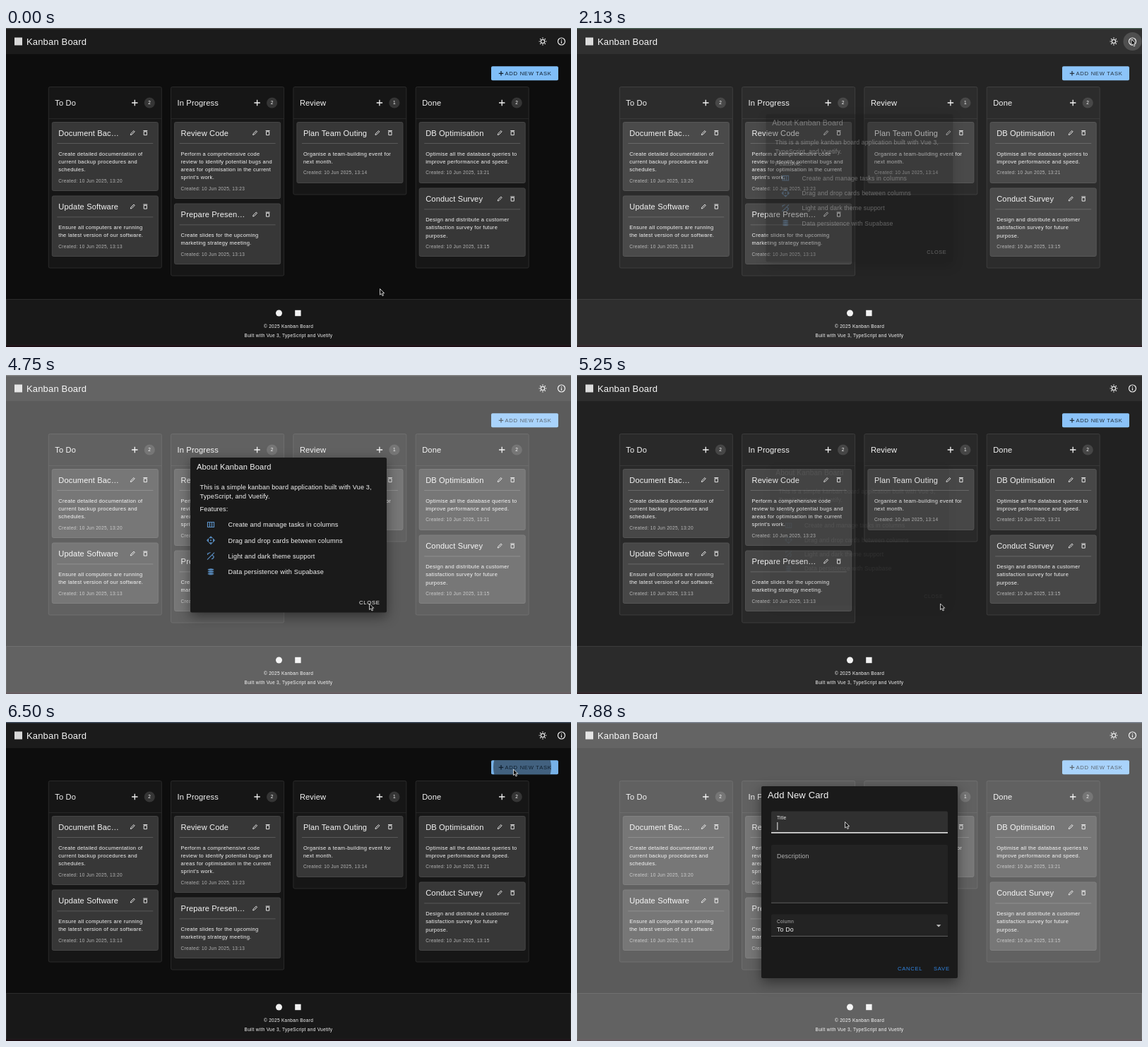
An HTML page that plays this animation: 800x452 px, repeating every 8 s.

```html
<!DOCTYPE html>
<html lang="en">
<head>
<meta charset="utf-8">
<title>Kanban Board</title>
<style>
  html, body { margin: 0; width: 100%; height: 100%; overflow: hidden; background: #0d0d0d; }
  svg { display: block; width: 100vw; height: 100vh; }
  text { font-family: "Liberation Sans", Arial, sans-serif; fill: #f4f4f4; white-space: pre; }
  .bar { font-size: 13px; letter-spacing: .16px; }
  .title { font-size: 11.1px; letter-spacing: .14px; }
  .body { font-size: 7.5px; letter-spacing: .27px; }
  .small { font-size: 6.5px; letter-spacing: .3px; }
  .text { font-size: 9.1px; letter-spacing: .17px; }
  .field { font-size: 8.8px; letter-spacing: .15px; }
  .btn { font-size: 7.7px; letter-spacing: .69px; }
  .line { fill: none; stroke: #f0f0f0; }
  .mid { text-anchor: middle; }
  .sheet { fill: #1a1a1a; filter: drop-shadow(0 6px 9px rgba(0, 0, 0, .45)); }
</style>
</head>
<body>
<svg id="stage" viewBox="0 0 800 452" xmlns="http://www.w3.org/2000/svg"></svg>
<script>
const LOOP = 8000, STEP = 125;

const text = (x, y, cls, str, fill) =>
  `<text x="${x}" y="${y}" class="${cls}"${fill ? ` style="fill:${fill}"` : ''}>${str}</text>`;
const rect = (x, y, w, h, fill, extra = '') =>
  `<rect x="${x}" y="${y}" width="${w}" height="${h}" fill="${fill}" ${extra}/>`;
const path = (d, width = 1, extra = '') =>
  `<path class="line" d="${d}" stroke-width="${width}" ${extra}/>`;
const at = (x, y, inner, scale = 1) =>
  `<g transform="translate(${x} ${y}) scale(${scale})">${inner}</g>`;

const plus = (x, y, r, color = '#f0f0f0') =>
  at(x, y, path(`M${-r} 0H${r}M0 ${-r}V${r}`, 1.3, `style="stroke:${color}"`));
const pencil = path('M-7 7l.8-4L4-7l3 3L-3 6.200z', 2.2);
const trash = path('M-5-4H5V7.500H-5zM-7-7H7', 2.2);

const columns = [
  ['To Do', 340, [
    ['Document Bac…', 133, 231, ['Create detailed documentation of', 'current backup procedures and', 'schedules.'], '13:20'],
    ['Update Software', 237.5, 324, ['Ensure all computers are running', 'the latest version of our software.'], '13:13']]],
  ['In Progress', 351, [
    ['Review Code', 133, 242, ['Perform a comprehensive code', 'review to identify potential bugs and', 'areas for optimisation in the current', 'sprint’s work.'], '13:23'],
    ['Prepare Presen…', 248.5, 335, ['Create slides for the upcoming', 'marketing strategy meeting.'], '13:13']]],
  ['Review', 236, [
    ['Plan Team Outing', 133, 220, ['Organise a team-building event for', 'next month.'], '13:14']]],
  ['Done', 340, [
    ['DB Optimisation', 133, 220, ['Optimise all the database queries to', 'improve performance and speed.'], '13:21'],
    ['Conduct Survey', 226.5, 324, ['Design and distribute a customer', 'satisfaction survey for future', 'purpose.'], '13:15']]]
];

function card(x, [title, top, bottom, lines, time]) {
  const first = top + 47.8;
  return rect(x + 5, top + .5, 150, bottom - top - 1, '#373737', 'rx="2" stroke="#454545"') +
    text(x + 14, top + 19.5, 'title', title) +
    at(x + 119, top + 15.5, pencil, .42) + at(x + 137, top + 15.5, trash, .42) +
    rect(x + 12, top + 30, 136, .8, '#626262') +
    lines.map((s, i) => text(x + 14, first + i * 11.1, 'body', s)).join('') +
    text(x + 14, first + lines.length * 11.1 + 4.4, 'small', `Created: 10 Jun 2025, ${time}`, '#b4b4b4');
}

function column([name, bottom, cards], i) {
  const x = 60.3 + i * 173.3;
  return rect(x, 83.5, 160, bottom - 83.5, '#161616', 'rx="2" stroke="#2b2b2b"') +
    rect(x, 128, 160, .8, '#2b2b2b') +
    text(x + 9, 110, 'title', name) + plus(x + 122, 106, 4.2) +
    `<circle cx="${x + 143}" cy="106" r="7.6" fill="#353535"/>` +
    text(x + 143, 108.4, 'small mid', cards.length) +
    cards.map(c => card(x, c)).join('');
}

const rays = [...Array(8)].map((_, i) => {
  const a = i * Math.PI / 4, c = Math.cos(a), s = Math.sin(a);
  return `M${c * 3.9} ${s * 3.9}L${c * 5.4} ${s * 5.4}`;
}).join('');

const page =
  rect(0, 0, 800, 452, '#0d0d0d') + rect(0, 0, 800, 37, '#1b1b1b') +
  rect(0, 0, 800, 1.3, '#505050', 'id="edge"') +
  rect(12, 13.5, 11, 11, '#d8d8d8') + text(29, 23.5, 'bar', 'Kanban Board') +
  at(760, 19, path(rays, 1.2) + '<circle r="2.7" class="line" stroke-width="1.2"/>') +
  at(786.5, 19, '<circle r="5" class="line" stroke-width="1.2"/>' + path('M0-.5V2.800M0-2.700V-1.500', 1.2)) +
  '<circle id="infoRipple" cx="786.5" cy="19" r="13" fill="#fff"/>' +
  rect(687, 54.3, 95, 20, '#80bef8', 'rx="2"') +
  '<g clip-path="url(#addClip)">' + rect(687, 54, 95, 21, '#000', 'id="addShade"') +
  '<circle id="addRipple" cx="731" cy="64" r="41" fill="#000"/></g>' +
  plus(701, 64.3, 3.2, '#10202f') + text(706.5, 67.1, 'btn', 'ADD NEW TASK', '#10202f') +
  columns.map(column).join('') +
  rect(.5, 384.500, 799, 65, '#181818', 'stroke="#2b2b2b"') +
  '<circle cx="386.5" cy="404" r="4.500" fill="#f0f0f0"/>' + rect(409.2, 399.8, 8.4, 8.4, '#f0f0f0') +
  text(400, 424.9, 'small mid', '© 2025 Kanban Board') +
  text(400, 438.4, 'small mid', 'Built with Vue 3, TypeScript and Vuetify') +
  rect(0, 449.500, 800, 2.500, '#1c0d13');

const blue = 'style="stroke:#5a8fc4"';
const features = [
  ['Create and manage tasks in columns', path('M-4.500-3.500H4.500V3.500H-4.500zM-1.500-3.500V3.500M1.500-3.500V3.500', 1.2, blue)],
  ['Drag and drop cards between columns', path('M-1.800-3.500L0-5.300 1.800-3.500zM-1.800 3.500L0 5.300 1.800 3.500zM-3.500-1.800L-5.300 0-3.500 1.800zM3.500-1.800L5.300 0 3.500 1.800zM-1 0H1M0-1V1', 1.1, blue)],
  ['Light and dark theme support', path('M-5 5L5-5M-4.500-1.500A3 3 0 0 1-1.500-4.500M-5-4L-4-3M-1-5.500V-4.500M1 4A3.500 3.500 0 0 0 4 0 3 3 0 0 1 1 4M2-1.500L4.500 1', 1.1, blue)],
  ['Data persistence with Supabase', [-3, 0, 3].map(y =>
    `<path d="M-4.300 ${y - 1}Q0 ${y - 2.8} 4.300 ${y - 1}V${y + .6}Q0 ${y + 2.4}-4.300 ${y + .6}z" fill="#5a8fc4" stroke="#1a1a1a" stroke-width=".5"/>`).join('')]
];

const about =
  rect(261, 117, 278, 219.5, '', 'rx="2" class="sheet"') +
  text(270, 134, 'title', 'About Kanban Board') +
  text(274.5, 162, 'text', 'This is a simple kanban board application built with Vue 3,') +
  text(274.5, 175.2, 'text', 'TypeScript, and Vuetify.') + text(274.5, 193.2, 'text', 'Features:') +
  features.map(([s, icon], i) =>
    at(290, 212 + i * 22.3, icon) + text(314.5, 215.3 + i * 22.3, 'text', s)).join('') +
  text(500, 325, 'btn', 'CLOSE');

const field = (y, h, fill, line) =>
  `<path d="M275 ${y + h}V${y + 2}q0-2 2-2H523q2 0 2 2V${y + h}z" fill="${fill}"/>` + line;
const form =
  rect(261, 91, 278, 272, '', 'rx="2" class="sheet"') + text(270, 108, 'bar', 'Add New Card') +
  field(126.500, 30.500, '#303030', rect(275, 156.2, 250, 1.4, '#fff')) +
  text(283, 137.5, 'small', 'Title') + rect(283.4, 142, .9, 11, '#fff', 'id="caret"') +
  field(174, 82.5, '#232323', rect(275, 255.8, 250, .8, '#6c6c6c')) +
  text(283, 193, 'field', 'Description', '#b0b0b0') +
  field(272.5, 31, '#232323', rect(275, 303, 250, .8, '#6c6c6c')) +
  text(283, 284.5, 'small', 'Column', '#b0b0b0') + text(283, 297.3, 'field', 'To Do') +
  '<path d="M508.800 287.300h6.600l-3.300 3.300z" fill="#c4c4c4"/>' +
  text(454, 351.6, 'btn', 'CANCEL', '#2f82dd') + text(505, 351.6, 'btn', 'SAVE', '#2f82dd');

const stage = document.getElementById('stage');
stage.innerHTML =
  '<defs><clipPath id="addClip"><rect x="687" y="54.3" width="95" height="20" rx="2"/></clipPath></defs>' +
  page + rect(0, 0, 800, 452, '#fff', 'id="scrim"') +
  `<g id="about">${about}</g><g id="form">${form}</g>` +
  '<path id="cursor" d="M0 0V8.600L2 6.800 3.500 10 5 9.300 3.600 6.200H6.200z" fill="#111" stroke="#f2f2f2" stroke-width=".8"/>';

const el = id => document.getElementById(id);
const [edge, infoRipple, addShade, addRipple, scrim, aboutBox, formBox, caret, cursor] =
  ['edge', 'infoRipple', 'addShade', 'addRipple', 'scrim', 'about', 'form', 'caret', 'cursor'].map(el);

const ramp = (t, from, to) => Math.min(1, Math.max(0, (t - from) / (to - from)));
const smooth = u => u * u * (3 - 2 * u);
const easeOut = u => 1 - (1 - u) ** 2;
const linear = u => u;

// start, end, target x, target y, easing
const moves = [
  [300, 1500, 785, 16, smooth],
  [3280, 4650, 514.5, 324, smooth],
  [5520, 6330, 718.5, 67, smooth],
  [6530, 6750, 573.5, 136.5, linear],
  [6750, 7200, 379.5, 141.5, easeOut]
];

function pointer(t) {
  let x = 529.5, y = 369.5;
  for (const [from, to, tx, ty, ease] of moves) {
    const u = ease(ramp(t, from, to));
    x += (tx - x) * u;
    y += (ty - y) * u;
  }
  return [x, y];
}

function show(box, level) {
  const s = .9 + .1 * easeOut(level);
  box.setAttribute('opacity', level);
  box.setAttribute('transform', `translate(400 226) scale(${s}) translate(-400 -226)`);
}

function render(ms) {
  const t = Math.floor(ms / STEP) * STEP;
  const [x, y] = pointer(t);
  cursor.setAttribute('transform', `translate(${x} ${y})`);

  const veil = ramp(t, 2060, 2280) - ramp(t, 5110, 5300) + ramp(t, 6560, 6780);
  scrim.setAttribute('opacity', .32 * veil);
  show(aboutBox, ramp(t, 2060, 2270) - ramp(t, 5110, 5260));
  show(formBox, ramp(t, 6560, 6740));

  infoRipple.setAttribute('opacity', .07 * ramp(t, 1400, 1600) * (1 - ramp(t, 2100, 2400)) +
    .15 * ramp(t, 1650, 1850) * (1 - ramp(t, 2000, 2300)));
  addShade.setAttribute('opacity', .07 * ramp(t, 6150, 6300) * (1 - ramp(t, 6600, 6900)) +
    .14 * ramp(t, 6560, 6700) * (1 - ramp(t, 6760, 7000)));
  addRipple.setAttribute('opacity', .45 * ramp(t, 6380, 6480) * (1 - ramp(t, 6520, 6720)));
  caret.setAttribute('opacity', (t - 6640) % 1000 < 500 ? 1 : 0);
  edge.setAttribute('fill', t >= 1250 && t < 2130 ? '#3d5549' : t >= 5630 ? '#465468' : '#505050');
}

function tick(now) {
  render(now % LOOP);
  requestAnimationFrame(tick);
}
render(0);
requestAnimationFrame(tick);
</script>
</body>
</html>
```
